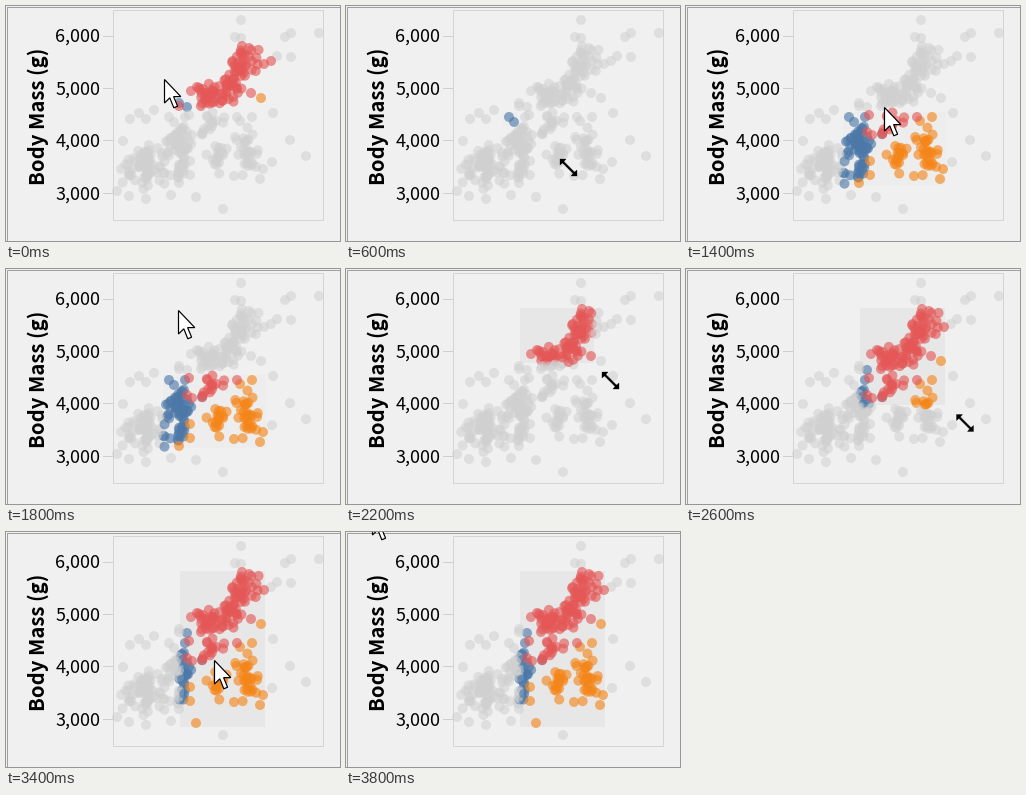
Recreate the animation shown at these times as a matplotlib script. Size 334 px wide and 235 px high, loop 4000 ms.

```python
import numpy as np
import matplotlib.pyplot as plt
from matplotlib.animation import FuncAnimation
from matplotlib.colors import to_rgba
from matplotlib.patches import Polygon, Rectangle

W, H, DPI = 334, 235, 100
PT = 72 / DPI  # points per pixel
FRAMES, STEP = 20, 200
FONT = "Noto Sans CJK JP"
GREY = to_rgba("#d0d0d0", 0.55)

rng = np.random.default_rng(7)


def blob(n, x, y, sx, sy, slope=0.0):
    """Truncated normal cloud, tilted by slope."""
    z = rng.normal(size=(n * 4, 2))
    z = z[np.abs(z).max(axis=1) < 1.9][:n]
    dx = z[:, 0] * sx
    return np.column_stack([x + dx, y + slope * dx + z[:, 1] * sy])


# species: colour, clouds, and single points that stand apart
SPECIES = [
    ("#4c78a8",
     [(66, 141, 161, 14, 14, -0.2), (46, 174, 139, 7, 11), (12, 172, 164, 6, 5)],
     [(111, 185), (124, 113), (133, 107), (148, 104), (140, 113), (117, 135),
      (163, 111), (168, 116), (173, 97), (181, 101), (179, 111), (196, 128),
      (123, 190), (140, 193), (165, 189)]),
    ("#f58518",
     [(18, 211, 154, 6, 8, -0.3), (30, 242, 146, 7, 13)],
     [(255, 92), (267, 107), (246, 111), (284, 134), (300, 150), (266, 156),
      (234, 115), (217, 203), (190, 191), (173, 177), (184, 155), (184, 169),
      (254, 173), (228, 170), (257, 163)]),
    ("#e45756",
     [(34, 238, 57, 8, 8, -0.4), (52, 212, 88, 13, 8, -0.4),
      (15, 206, 117, 7, 6)],
     [(235, 14), (313, 27), (285, 27), (279, 31), (229, 31), (235, 32),
      (271, 50), (285, 51), (265, 55), (258, 58), (243, 42), (236, 40),
      (185, 85), (191, 81), (173, 100), (181, 126), (186, 129), (183, 109),
      (245, 87), (231, 111)]),
]

clouds, colors = [], []
for color, blobs, singles in SPECIES:
    pts = np.vstack([blob(*b) for b in blobs] + [np.array(singles, float)])
    clouds.append(pts)
    colors += [to_rgba(color, 0.62)] * len(pts)
points = np.vstack(clouds)
colors = np.array(colors)

# pointer per step: shape and position
ARROW = np.array([(0.5, 0.5), (0.5, 24), (5.8, 18.8), (9.8, 28.8), (13.6, 27.2),
                  (9.6, 17.6), (16.8, 17.6)])
RESIZE = np.array([(-8.5, -8.5), (-2.5, -8.5), (-4.6, -6), (6, 4.6), (8.5, 2.5),
                   (8.5, 8.5), (2.5, 8.5), (4.6, 6), (-6, -4.6), (-8.5, -2.5)])
POINTER = [
    ("a", 158, 73), ("a", 175, 143), ("a", 162, 106),
    ("r", 222.5, 161.5), ("r", 250, 178), ("r", 269.5, 191.5),
    ("a", 245, 173), ("a", 198, 101), ("a", 182, 56), ("a", 172, 41),
    ("r", 218, 73), ("r", 264.5, 111.5), ("r", 277, 132), ("r", 279, 154),
    ("r", 273, 183), ("r", 271.5, 193.5), ("r", 276, 213),
    ("a", 208, 128), None, ("a", 26, -21),
]
# how far the brush corner trails the pointer
LAG = np.array([17, 18])


def brush_box(i):
    """Brush corners and fill strength at step i."""
    if i < 3:
        return 160, 37, 268, 106, 0.0
    if i < 10:
        x0, y0, last, alpha = 157, 106, (260, 179), 0.012
        if i == 3:
            return x0, y0, 171, 119, alpha
        if i > 5:
            return x0, y0, *last, alpha
    else:
        x0, y0, last, alpha = 173.5, 38.5, (259, 195), 0.045
        if i == 10:
            return x0, y0, 180, 44, alpha
        if i > 15:
            return x0, y0, *last, alpha
    x1, y1 = np.minimum(np.array(POINTER[i][1:]) - LAG, last)
    return x0, y0, x1, y1, alpha


fig = plt.figure(figsize=(W / DPI, H / DPI), dpi=DPI, facecolor="#f0f0f0")
ax = fig.add_axes([0, 0, 1, 1])
ax.set_xlim(0, W)
ax.set_ylim(H, 0)
ax.axis("off")

# window edge
ax.plot([0.5, 0.5, W], [H, 0.5, 0.5], color="#a0a0a0", lw=PT)

# plot frame and axis
ax.add_patch(Rectangle((106.5, 3.5), 210, 210, fill=False, ec="#d4d4d4", lw=PT))
for k, y in zip((6, 5, 4, 3), (29.5, 82, 134.5, 187)):
    ax.plot([97, 106], [round(y) - 0.5] * 2, color="#cfcfcf", lw=PT)
    ax.text(94.5, y + 6.5, f"{k},000", family=FONT, size=18 * PT,
            ha="right", va="baseline", color="black")
ax.text(32, 110, "Body Mass (g)", family=FONT, size=20.3 * PT, weight="bold",
        rotation=90, ha="center", va="center", color="black")

brush = ax.add_patch(Rectangle((0, 0), 1, 1, fc="#333333", ec="none", zorder=2))
dots = ax.scatter(*points.T, s=(10 * PT) ** 2, linewidths=0, zorder=3)
pointer = ax.add_patch(Polygon(ARROW, closed=True, ec="black", zorder=5,
                               joinstyle="miter"))


def update(i):
    x0, y0, x1, y1, alpha = brush_box(i)
    brush.set_bounds(x0, y0, x1 - x0, y1 - y0)
    brush.set_alpha(alpha)

    x, y = points.T
    inside = (x >= x0) & (x <= x1) & (y >= y0) & (y <= y1)
    dots.set_facecolors(np.where(inside[:, None], colors, GREY))

    pointer.set_visible(POINTER[i] is not None)
    if POINTER[i]:
        kind, px, py = POINTER[i]
        arrow = kind == "a"
        pointer.set_xy((ARROW if arrow else RESIZE) + (px, py))
        pointer.set_facecolor("white" if arrow else "black")
        pointer.set_linewidth(1.2 * PT if arrow else 0.3 * PT)
    return brush, dots, pointer


anim = FuncAnimation(fig, update, frames=FRAMES, interval=STEP,
                     repeat=True, repeat_delay=0)
plt.show()
```
